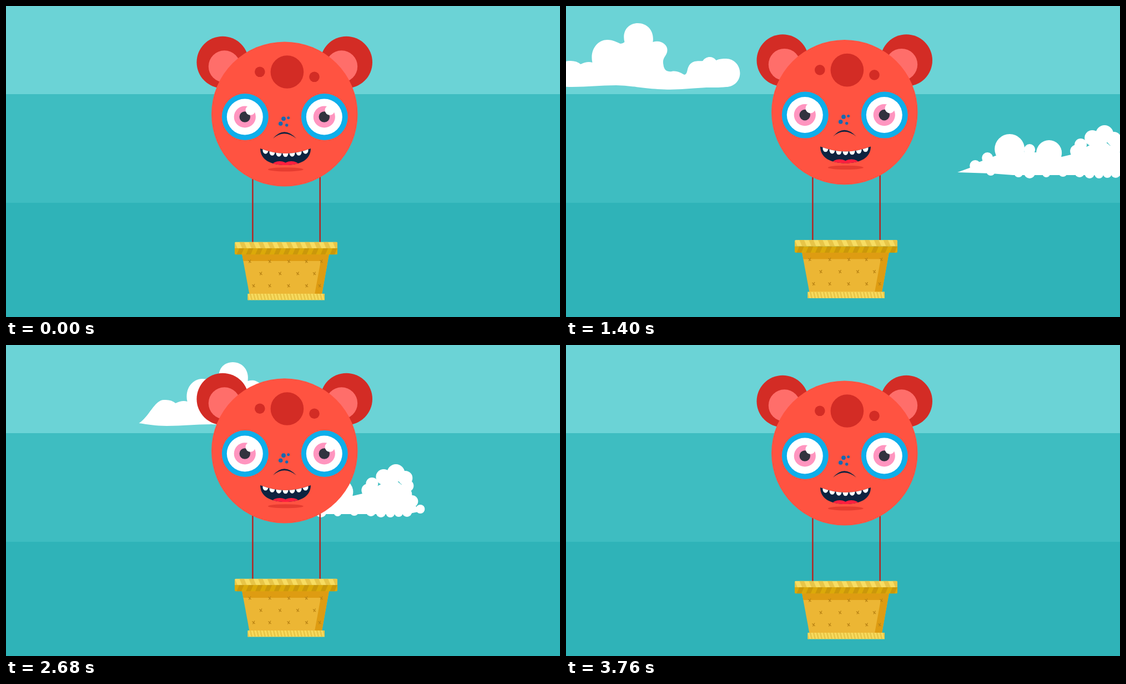
Recreate the animation shown at these times as an HTML page with a canvas. Size 998x561 px, loop 3800 ms.

```html
<!DOCTYPE html>
<html lang="en">
<head>
<meta charset="utf-8">
<title>Bear balloon</title>
<style>
  html, body { margin: 0; width: 100%; height: 100%; overflow: hidden; background: #3ebdc1; }
  canvas { display: block; width: 998px; height: 561px; }
</style>
</head>
<body>
<canvas id="stage" width="998" height="561"></canvas>
<script>
const ctx = document.getElementById('stage').getContext('2d');
const LOOP = 3800, STEP = 40, END = 3760;
const TURN = 1840;                      // clouds reverse here
const BOB = END / 3, RISE = 570, LIFT = 10.3;
const NAVY = '#0d2340', DEEP_RED = '#d32c25';

const upperCloud = new Path2D(`M0 141 C18 130 28 99 45 99 Q58 98 66 105 Q78 99 87 102
  C82 78 97 61 114 61 C125 61 132 66 138 68 Q142 68 145 65 C140 45 152 31 169 31
  C187 31 199 46 196 65 C210 60 223 70 222 80 C222 90 212 92 215 106
  C216 116 222 119 230 118 C240 116 248 122 253 124 C260 122 256 112 264 104
  C271 97 282 100 286 99 C292 90 304 90 310 98 C316 95 322 95 328 95
  C342 95 353 107 353 121 C353 136 341 146 328 146 C310 148 300 146 285 147.5
  C255 149 240 152 205 150 C175 148 160 144 130 143 C100 143 80 146 50 146
  C30 146 15 143 0 141Z`);

const lowerCloud = new Path2D(`M0 300 L22 292 L35 283 L90 262 L165 265 L188 272 L205 268
  L260 240 L285 260 L295 285 L310 300 L285 305 L100 305 L60 302 L30 301Z`);
const puffs = [
  [32, 288, 10], [54, 274, 10], [94, 258, 27], [130, 259, 10], [165, 265, 23],
  [215, 262, 12], [222, 250, 11], [243, 238, 14], [265, 231, 16], [282, 240, 13],
  [286, 254, 11], [280, 270, 14], [294, 282, 11], [309, 296, 8], [285, 301, 9],
  [270, 302, 8], [255, 303, 8], [238, 302, 9], [220, 300, 9], [190, 300, 8],
  [160, 302, 7], [130, 301, 10], [110, 301, 8], [60, 298, 8]
];

const mouth = new Path2D('M458 257 Q503.5 275 549 257 C549 278 529 287 503.5 287 S458 278 458 257Z');
const nose = new Path2D('M481 239 Q501 215.5 523 239 Q501 221.5 481 239Z');

const mix = (a, b, p) => a + (b - a) * p;
const pingPong = t => t < TURN ? t / TURN : (END - t) / (END - TURN);
const smooth = p => p * p * (3 - 2 * p);

// Constant-speed start, soft landing.
function settle(p) {
  let lo = 0, hi = 1;
  const curve = (u, a, b) => 3 * (1 - u) ** 2 * u * a + 3 * (1 - u) * u * u * b + u ** 3;
  for (let i = 0; i < 20; i++) {
    const mid = (lo + hi) / 2;
    if (curve(mid, 1 / 6, 2 / 3) < p) lo = mid; else hi = mid;
  }
  return curve(lo, 1 / 6, 1);
}

function bob(t) {
  const local = t % BOB;
  return -LIFT * (local < RISE ? settle(local / RISE) : 1 - smooth((local - RISE) / (BOB - RISE)));
}

function rect(x, y, w, h, color) {
  ctx.fillStyle = color;
  ctx.fillRect(x, y, w, h);
}

function oval(x, y, rx, color, ry = rx) {
  ctx.fillStyle = color;
  ctx.beginPath();
  ctx.ellipse(x, y, rx, ry, 0, 0, Math.PI * 2);
  ctx.fill();
}

function poly(color, ...pts) {
  ctx.fillStyle = color;
  ctx.beginPath();
  for (let i = 0; i < pts.length; i += 2) ctx.lineTo(pts[i], pts[i + 1]);
  ctx.fill();
}

function fill(path, color) {
  ctx.fillStyle = color;
  ctx.fill(path);
}

function clipped(build, draw) {
  ctx.save();
  build();
  draw();
  ctx.restore();
}

function stripedBand(x, y, w, h, gap, slant, base, stripe) {
  rect(x, y, w, h, base);
  clipped(() => { ctx.beginPath(); ctx.rect(x, y, w, h); ctx.clip(); }, () => {
    for (let s = x - gap / 2; s < x + w + gap; s += gap)
      poly(stripe, s, y, s + gap / 2, y, s + gap / 2 + slant, y + h, s + slant, y + h);
  });
}

function drawSky() {
  rect(0, 0, 998, 159, '#6bd3d6');
  rect(0, 159, 998, 196, '#3ebdc1');
  rect(0, 355, 998, 206, '#2fb3b8');
}

function drawClouds(p) {
  clipped(() => ctx.translate(mix(1031, -376, p), 0), () => fill(upperCloud, '#fff'));
  clipped(() => ctx.translate(mix(-322, 1028, p), 0), () => {
    fill(lowerCloud, '#fff');
    for (const [x, y, r] of puffs) oval(x, y, r, '#fff');
  });
}

function drawStitches(y, ...xs) {
  ctx.strokeStyle = '#b98314';
  ctx.lineWidth = 1.3;
  ctx.beginPath();
  for (const x of xs) {
    ctx.moveTo(x - 2.5, y - 2); ctx.lineTo(x + 2.5, y + 2.5);
    ctx.moveTo(x + 2, y - 3); ctx.lineTo(x - 1.5, y + 3);
  }
  ctx.stroke();
}

function drawBasket() {
  rect(443.2, 300, 2.4, 128, '#b9211d');
  rect(564.5, 300, 2.4, 128, '#b9211d');
  poly('#ecb634', 425, 447, 582, 447, 569, 520, 438.5, 520);
  poly('#de9c12', 425, 447, 582, 447, 569, 520, 556, 520, 567, 460, 427.5, 460);
  drawStitches(460.5, 439, 475, 509.5, 541, 568);
  drawStitches(482.5, 459, 493.5, 525.5, 555.5);
  drawStitches(504.5, 446, 475, 509, 541.5, 565);
  clipped(() => { ctx.beginPath(); ctx.roundRect(412, 425.5, 185, 23, 2.5); ctx.clip(); }, () => {
    stripedBand(412, 425.5, 185, 11.5, 16.8, 5, '#f7dc62', '#e8c548');
    stripedBand(412, 437, 185, 11.5, 16.8, -5, '#dba909', '#ca980a');
  });
  stripedBand(435.5, 519, 138.5, 11.5, 6, 3, '#f8dc5f', '#e9c648');
}

function drawEye(x) {
  oval(x, 200, 42, '#0eaeea');
  oval(x - 0.5, 200, 32.5, '#fff');
  oval(x - 0.5, 200, 19.6, '#ff95bf');
  oval(x - 0.5, 200, 9.8, '#32333f');
  oval(x + 9.5, 188, 8.8, '#fff');
}

function drawMouth() {
  fill(mouth, NAVY);
  clipped(() => ctx.clip(mouth), () => {
    oval(493, 286.5, 13, '#ff1f3f', 6.5);
    oval(514, 286.5, 13, '#ff1f3f', 6.5);
    for (let i = 0; i < 7; i++) {
      const x = 467.5 + i * 12, u = (x - 458) / 91;
      oval(x, 257 + 36 * u * (1 - u), 5, '#fff', 6.3);
    }
  });
  oval(503.8, 294.8, 32, '#e63c30', 3.6);
}

function drawHead() {
  oval(390.3, 101.5, 46.8, DEEP_RED);
  oval(613.2, 101.5, 46.8, DEEP_RED);
  oval(393.5, 109, 28.7, '#ff6e6a');
  oval(604.5, 109, 28.7, '#ff6e6a');
  oval(501.8, 195, 131.7, '#ff5341', 130.6);
  oval(506.4, 119, 29.8, DEEP_RED);
  oval(457.3, 118.8, 9.3, DEEP_RED);
  oval(555.5, 127.8, 9.3, DEEP_RED);
  drawEye(430.8);
  drawEye(573.8);
  for (const [x, y, r] of [[500, 203.3, 3.9], [508.7, 201.8, 2.5], [494.7, 212.3, 3.8], [505.7, 215, 2.7]])
    oval(x, y, r, '#1769b0');
  fill(nose, NAVY);
  drawMouth();
}

function render(now) {
  const t = Math.floor((now % LOOP) / STEP) * STEP;
  drawSky();
  drawClouds(pingPong(t));
  clipped(() => ctx.translate(0, bob(t)), () => {
    drawBasket();
    drawHead();
  });
  requestAnimationFrame(tick);
}

let start;
function tick(now) {
  start ??= now;
  render(now - start);
}
render(0);
</script>
</body>
</html>
```
